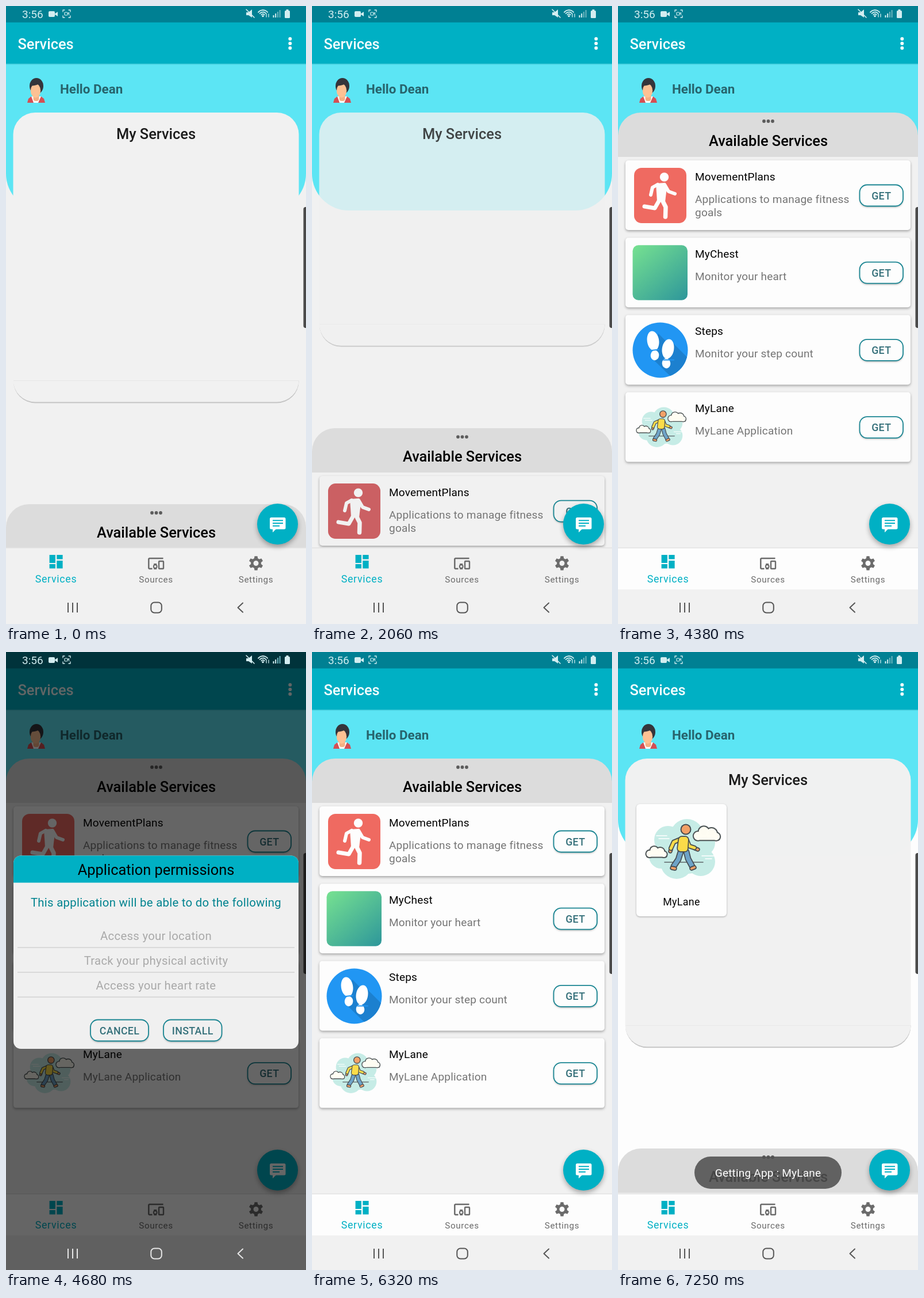
An HTML page with a canvas that plays this animation: 522 px wide and 1073 px high, repeating every 7350 ms.

```html
<!DOCTYPE html>
<html lang="en">
<head>
<meta charset="utf-8">
<title>Services app</title>
<style>
html, body { margin: 0; width: 100%; height: 100%; overflow: hidden; background: #f1f1f1; }
canvas { display: block; width: 522px; height: 1073px; }
</style>
</head>
<body>
<canvas id="stage"></canvas>
<script>
const W = 522, H = 1073, LOOP = 7350, TICK = 100;
const TEAL = '#00b0c4', CYAN = '#5ce5f4', GREY = '#f1f1f1', EDGE = '#1a8592';
const canvas = document.getElementById('stage');
const c = canvas.getContext('2d');
const ratio = window.devicePixelRatio || 1;
canvas.width = W * ratio;
canvas.height = H * ratio;

const apps = [
  { name: 'MovementPlans', text: ['Applications to manage fitness', 'goals'], icon: runnerIcon },
  { name: 'MyChest', text: ['Monitor your heart'], icon: heartIcon },
  { name: 'Steps', text: ['Monitor your step count'], icon: stepsIcon },
  { name: 'MyLane', text: ['MyLane Application'], icon: (x, y) => walker(x + 18, y + 26, 2 / 3) }
];

// Value held for one tick each, then the last one for good
function ticks(t, start, before, values) {
  if (t < start) return before;
  return values[Math.min(values.length - 1, Math.floor((t - start) / TICK))];
}

function rect(x, y, w, h, fill) {
  c.fillStyle = fill;
  c.fillRect(x, y, w, h);
}

function box(x, y, w, h, r, fill, stroke, width = 2) {
  c.beginPath();
  c.roundRect(x, y, w, h, r);
  if (fill) { c.fillStyle = fill; c.fill(); }
  if (stroke) { c.strokeStyle = stroke; c.lineWidth = width; c.stroke(); }
}

function oval(x, y, rx, ry, fill, turn = 0) {
  c.beginPath();
  c.ellipse(x, y, rx, ry, turn, 0, Math.PI * 2);
  c.fillStyle = fill;
  c.fill();
}

function poly(points, fill) {
  c.beginPath();
  points.forEach(p => c.lineTo(p[0], p[1]));
  c.closePath();
  c.fillStyle = fill;
  c.fill();
}

function line(points, color, width, cap = 'round') {
  c.beginPath();
  points.forEach(p => c.lineTo(p[0], p[1]));
  c.strokeStyle = color;
  c.lineWidth = width;
  c.lineCap = cap;
  c.lineJoin = 'round';
  c.stroke();
}

function label(str, x, y, size, color, { weight = 400, align = 'left', gap = 0 } = {}) {
  c.font = `${weight} ${size}px Roboto, sans-serif`;
  c.letterSpacing = (gap * size).toFixed(2) + 'px';
  c.textAlign = align;
  c.fillStyle = color;
  c.fillText(str, x, y);
}

function shaded(blur, dy, alpha, draw) {
  c.save();
  c.shadowColor = `rgba(0,0,0,${alpha})`;
  c.shadowBlur = blur * ratio;
  c.shadowOffsetY = dy * ratio;
  draw();
  c.restore();
}

function button(str, x, y, w, fill) {
  shaded(3, 2, 0.28, () => box(x, y, w, 37, 13, fill));
  box(x, y, w, 37, 13, null, EDGE, 1.8);
  label(str, x + w / 2, y + 25, 17.8, '#35707a', { weight: 500, align: 'center', gap: 0.02 });
}

function runnerIcon(x, y, paper, faded) {
  c.save();
  c.translate(x, y);
  box(15, 13, 91, 96, 13, faded ? '#cb6063' : '#ef6a61');
  oval(67.5, 29, 7.7, 7.7, paper);
  poly([[53, 40], [68, 39], [72, 47], [69, 72], [55, 71]], paper);
  line([[56, 42], [47, 47], [44, 60]], paper, 6);
  line([[68, 42], [75, 54], [86, 58]], paper, 6);
  line([[59, 69], [51, 83], [33, 80]], paper, 7);
  line([[64, 69], [70, 81], [69.5, 98]], paper, 7.5);
  c.restore();
}

function heartIcon(x, y) {
  const g = c.createLinearGradient(x + 20, y + 13, x + 100, y + 109);
  g.addColorStop(0, '#74df91');
  g.addColorStop(1, '#30999a');
  box(x + 12.5, y + 13, 95.5, 95.5, 10, g);
}

function sole(x, y, dir) {
  oval(x, y, 10.3, 17, '#fff', -0.15 * dir);
  oval(x + 3 * dir, y + 25, 7.3, 8.8, '#fff', 0.1 * dir);
  line([[x - 8, y + 18 - dir], [x + 10, y + 17 - 2 * dir]], '#2196f3', 2);
}

function stepsIcon(x, y) {
  const shade = '#1c80cf';
  c.save();
  c.translate(x, y);
  c.beginPath();
  c.arc(60.5, 61, 48, 0, Math.PI * 2);
  c.fillStyle = '#2196f3';
  c.fill();
  c.clip();
  poly([[57, 32], [110, 85], [110, 130], [90, 118], [47, 76]], shade);
  poly([[82, 48], [130, 96], [100, 125], [66, 90]], shade);
  sole(48, 45, 1);
  sole(74, 59, -1);
  c.restore();
}

function cloud(x, y, s) {
  const puffs = [[10, 18, 8], [20, 11, 9.5], [33, 14, 10], [41, 19, 7]];
  for (const [grow, color] of [[1.2, '#4c5355'], [-0.8, '#fffdf3']]) {
    puffs.forEach(p => oval(x + p[0] * s, y + p[1] * s, p[2] * s + grow, p[2] * s + grow, color));
    box(x + 4 * s - grow, y + 16 * s, 43 * s + grow * 2, 9.5 * s + grow, 5 * s, color);
  }
}

function limb(points, color, width) {
  line(points, '#454b50', width + 3.4);
  line(points, color, width);
}

// Walking figure, 132 by 104 units
function walker(x, y, s) {
  const mint = '#c6ece6', skin = '#f2a168', shirt = '#fbdc4a', jeans = '#6fa4c8';
  c.save();
  c.translate(x, y);
  c.scale(s, s);
  [[73, 29, 29], [40, 36, 24], [98, 41, 24], [28, 65, 21], [55, 76, 28], [97, 74, 25], [75, 60, 35]]
    .forEach(b => oval(b[0], b[1], b[2], b[2], mint));
  line([[20, 29], [38, 29]], '#fff', 1.5);
  line([[24, 34], [42, 34]], '#fff', 1.5);
  line([[99, 64], [121, 64]], '#fff', 1.5);
  line([[105, 69], [116, 69]], '#fff', 1.5);
  cloud(82, 11, 1.02);
  cloud(0, 46, 0.8);
  line([[34, 75], [101, 75]], '#5d6568', 1.6);
  limb([[72, 57], [75, 69], [82, 82]], jeans, 7.5);
  limb([[62, 57], [58, 70], [50, 82]], jeans, 7.5);
  limb([[47, 85], [52, 86]], skin, 4);
  limb([[81, 86], [86, 84]], skin, 4);
  limb([[45, 53], [44, 56]], skin, 4);
  limb([[87, 51], [92, 53]], skin, 4);
  limb([[62, 35], [50, 40], [45, 51]], shirt, 5);
  limb([[72, 35], [77, 47], [86, 50]], shirt, 5);
  limb([[64, 36], [70, 36], [69, 51], [62, 51], [64, 36]], shirt, 10);
  oval(71, 18, 9.5, 9.5, '#454b50');
  oval(71, 18, 7.5, 7.5, skin);
  c.restore();
}

function avatar() {
  poly([[44, 157], [61, 157], [66, 161], [68, 168], [37, 168], [39, 161]], '#d44f54');
  poly([[44, 157], [61, 157], [56, 168], [48, 168]], '#fff');
  box(47.5, 150, 10, 15, 4, '#f5b083');
  oval(53, 139, 12, 14, '#35353b');
  oval(51.5, 147, 8.7, 12, '#fdc193');
  oval(50, 135.5, 8, 2.4, '#35353b', -0.25);
}

function header() {
  box(0, 99, W, 256, [0, 0, 64, 64], CYAN);
  avatar();
  label('Hello Dean', 94, 152, 22.4, '#27646d', { weight: 700 });
  rect(0, 0, W, 100, TEAL);
  rect(0, 0, W, 28.5, '#008093');
  rect(0, 100, W, 1.5, '#3fc9d9');
  label('Services', 20.5, 75, 25.4, '#f6fdfd', { weight: 500 });
  [57, 65, 73].forEach(y => oval(494.3, y, 3, 3, '#f6fdfd'));
}

function serviceCard(open, installed) {
  const h = 503.5 * (1 - open);
  if (h < 1) return;
  const r = Math.min(38, h / 2);
  c.save();
  c.globalAlpha = 1 - open;
  box(12.5, 185, 497, h - 1, r, GREY);
  // Thin shadow, only outside the lower half of the card
  c.save();
  c.beginPath();
  c.rect(0, 185 + h - r, W, r + 4);
  c.roundRect(12.5, 185, 497, h - 1, r);
  c.clip('evenodd');
  c.beginPath();
  c.rect(0, 185 + h - r, W, r + 4);
  c.clip();
  box(13, 186, 496.5, h, r, '#c4c4c4');
  c.restore();
  c.beginPath();
  c.roundRect(12.5, 185, 497, h - 1, r);
  c.clip();
  label('My Services', 261, 231, 25.4, '#1c1c1c', { weight: 500, align: 'center' });
  if (installed) {
    shaded(3, 1, 0.3, () => box(32, 264, 157, 195, 6, '#fefefe'));
    walker(47, 290, 1);
    label('MyLane', 110.5, 439.5, 17.8, '#000', { align: 'center', gap: 0.02 });
  }
  c.restore();
}

function sheet(top, paper, early, pressed) {
  c.save();
  c.beginPath();
  c.rect(0, 100, W, 841);
  c.clip();
  rect(0, top + 76, W, H, GREY);
  box(0, top, W, 77, [40, 40, 0, 0], '#dcdcdc');
  [254, 261.5, 269].forEach(x => oval(x, top + 15, 2.9, 2.9, '#5c5c5c'));
  label('Available Services', 261.5, top + 57.5, 25.4, '#000', { weight: 500, align: 'center' });
  apps.forEach((app, i) => {
    const y = top + 83 + i * 134.2;
    shaded(4, 2, 0.33, () => box(13, y, 496, 121, 5, paper));
    app.icon(13, y, paper, early);
    label(app.name, 134, y + 34.5, 19.05, '#000', { gap: 0.01 });
    app.text.forEach((s, n) => label(s, 134, y + 73.5 + n * 23, 19.05, '#757575', { gap: 0.01 }));
    button('GET', 420.5, y + 42.5, 75.5, i === 3 && pressed ? CYAN : paper);
  });
  c.restore();
}

function gear(x, y) {
  c.beginPath();
  for (let i = 0; i < 6; i++) {
    const a = i * Math.PI / 3 - Math.PI / 2;
    [[-0.36, 9], [-0.2, 12.6], [0.2, 12.6], [0.36, 9]].forEach(([d, r]) =>
      c.lineTo(x + r * Math.cos(a + d), y + r * Math.sin(a + d)));
  }
  c.closePath();
  c.moveTo(x + 4.5, y);
  c.arc(x, y, 4.5, 0, Math.PI * 2);
  c.fillStyle = '#6b6b6b';
  c.fill('evenodd');
}

function devices(x, y) {
  const k = '#6b6b6b';
  line([[x + 12.5, y - 9], [x - 11.5, y - 9], [x - 12.7, y - 8], [x - 12.7, y + 8], [x - 11.5, y + 9], [x - 6.5, y + 9]], k, 2.5, 'butt');
  box(x + 5, y - 4, 8, 13, 1, null, k, 2.4);
  rect(x - 3.8, y, 5, 10.2, k);
  oval(x - 1.3, y + 5.1, 3.9, 3.9, k);
  oval(x - 1.3, y + 5.1, 1.9, 1.9, '#f4f4f4');
}

function bottomBar(paper) {
  rect(0, 940, W, 2, '#e2e2e2');
  rect(0, 941.5, W, 72, paper);
  rect(0, 1013, W, 60, GREY);
  [[75.6, 953, 14], [75.6, 969, 7.5], [88.3, 953, 7.5], [88.3, 963, 13.5]]
    .forEach(([x, y, h]) => rect(x, y, 10.3, h, TEAL));
  devices(261, 968);
  gear(435, 967.5);
  label('Services', 87, 1000.5, 17.8, TEAL, { align: 'center', gap: 0.04 });
  label('Sources', 261, 1000.5, 15.24, '#6b6b6b', { align: 'center', gap: 0.04 });
  label('Settings', 435, 1000.5, 15.24, '#6b6b6b', { align: 'center', gap: 0.04 });
}

function chatButton() {
  shaded(8, 4, 0.32, () => oval(472.5, 899.5, 35.5, 35.5, TEAL));
  box(459, 888, 27.5, 20.5, 2.5, '#fff');
  poly([[464, 906], [472, 906], [464, 914]], '#fff');
  [[893.3, 18], [898, 18], [902.7, 12]].forEach(([y, w]) => rect(464, y - 1, w, 2, TEAL));
}

function statusIcons() {
  const k = '#d3edf0';
  label('3:56', 28, 20.5, 19, k);
  box(74, 9, 11, 10, 2, k);
  poly([[84, 14], [90, 10], [90, 18]], k);
  for (const sx of [-1, 1]) for (const sy of [-1, 1]) {
    line([[105.5 + sx * 3.5, 13.5 + sy * 6.5], [105.5 + sx * 6.5, 13.5 + sy * 6.5], [105.5 + sx * 6.5, 13.5 + sy * 3.5]], k, 1.3);
  }
  box(102, 11, 5, 5, 1, null, k, 1.2);
  line([[107, 13.5], [109.5, 11.5], [109.5, 15.5]], k, 1.1);
  poly([[418, 11], [422, 11], [428, 6], [428, 20], [422, 16], [418, 16]], k);
  line([[418, 6], [432, 20]], k, 1.6);
  [3.5, 7, 10.5].forEach(r => {
    c.beginPath();
    c.arc(447, 17.5, r, -Math.PI * 0.78, -Math.PI * 0.22);
    c.strokeStyle = k;
    c.lineWidth = 1.8;
    c.stroke();
  });
  oval(447, 17.5, 1.8, 1.8, k);
  line([[453, 19], [453, 14]], k, 1.3);
  line([[457, 14], [457, 19]], k, 1.3);
  [4, 7, 10, 13].forEach((h, i) => rect(464.5 + i * 3.7, 20 - h, 2, h, i < 2 ? k : '#6fb5bf'));
  box(485, 8, 9, 13, 1.5, k);
  rect(487.5, 6, 4, 2, k);
}

function systemKeys(color) {
  [108, 116, 124].forEach(x => line([[x, 1036], [x, 1053]], color, 2, 'butt'));
  box(252.3, 1035.5, 18.5, 18, 6, null, color, 2);
  line([[412, 1036.5], [403.5, 1044.5], [412, 1052.5]], color, 2);
}

function dialog(shown) {
  if (!shown) return;
  rect(0, 0, W, H, `rgba(0,0,0,${0.6 * shown})`);
  c.save();
  c.globalAlpha = shown;
  const s = 0.94 + 0.06 * shown;
  c.translate(261, 521);
  c.scale(s, s);
  c.translate(-261, -521);
  box(13, 353.5, 496, 335.5, 13, '#f0f0f0');
  box(13, 353.5, 496, 47, [13, 13, 0, 0], TEAL);
  const mid = { align: 'center', gap: 0.0144 };
  label('Application permissions', 261, 387, 25.4, '#000', { align: 'center' });
  label('This application will be able to do the following', 261, 442, 20.32, '#00838f', mid);
  ['Access your location', 'Track your physical activity', 'Access your heart rate'].forEach((item, i) => {
    label(item, 261, 499.5 + i * 43, 20.32, '#a9a9a9', mid);
    rect(20, 512.3 + i * 43, 482, 1.7, '#d6d6d6');
  });
  button('CANCEL', 147, 638.5, 101, '#f0f0f0');
  button('INSTALL', 274, 638.5, 101.5, '#f0f0f0');
  c.restore();
}

function toast(shown) {
  if (!shown) return;
  c.save();
  c.globalAlpha = shown;
  box(133, 876, 256, 56, 28, 'rgba(80,80,80,0.88)');
  label('Getting App : MyLane', 261, 911, 19.05, '#fff', { align: 'center', gap: 0.01 });
  c.restore();
}

function draw(t) {
  const early = t < 2160;
  const paper = early ? GREY : '#fdfdfd';
  const open = t < 7050
    ? ticks(t, 2060, 0, [0.194, 0.56, 0.88, 1])
    : ticks(t, 7050, 1, [0.68, 0.2, 0.0044]);
  const modal = t < 6120
    ? ticks(t, 4480, 0, [0.3, 0.8, 1])
    : ticks(t, 6120, 1, [1, 0.45, 0]);

  c.setTransform(ratio, 0, 0, ratio, 0, 0);
  rect(0, 0, W, H, paper);
  header();
  serviceCard(open, t >= 7050);
  sheet(865 - 680 * open, paper, early, t < 4380);
  bottomBar(paper);
  chatButton();
  box(517.5, 349, 10, 210, 4, '#4a4a4a');
  dialog(modal);
  toast(ticks(t, 6420, 0, [0.35, 0.75, 0.97, 1]));
  statusIcons();
  systemKeys(modal > 0.5 ? '#e6e6e6' : '#565656');
}

const begin = performance.now();
function frame() {
  draw((performance.now() - begin) % LOOP);
  requestAnimationFrame(frame);
}
frame();
</script>
</body>
</html>
```
